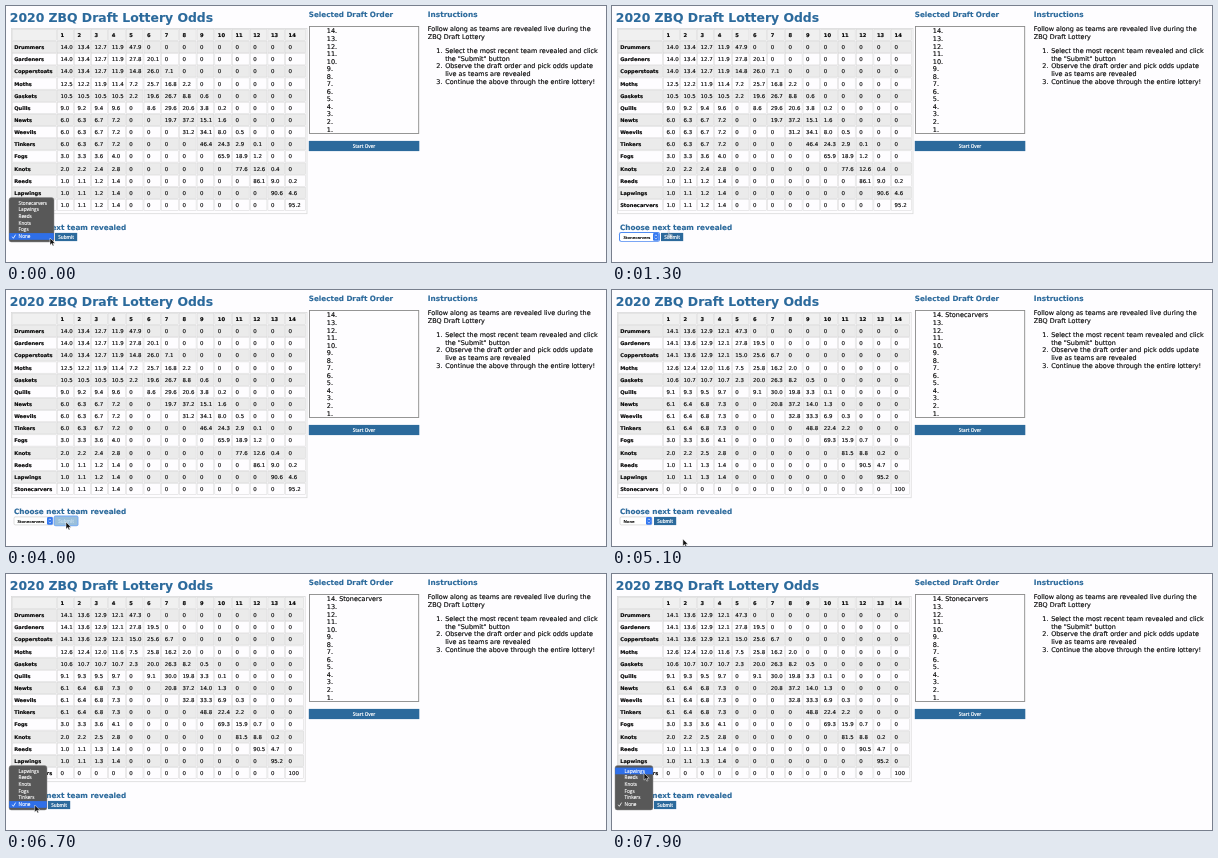
These frames come from a looping animation (600x256 px, 8000 ms). An HTML page:

```html
<!DOCTYPE html>
<html lang="en">
<head>
<meta charset="utf-8">
<title>Draft Lottery Odds</title>
<style>
html, body { margin: 0; width: 100%; height: 100%; overflow: hidden; background: #fefdff; }
svg { display: block; width: 600px; height: 256px; font-family: "DejaVu Sans", Verdana, sans-serif; }
text { white-space: pre; fill: currentColor; stroke: currentColor; stroke-width: 0.13px; }
.ui { font-family: "Open Sans", "Noto Sans", sans-serif; }
</style>
</head>
<body>
<svg id="stage" viewBox="0 0 600 256"></svg>
<script>
const NS = 'http://www.w3.org/2000/svg';
const stage = document.getElementById('stage');
const LOOP = 8000, STEP = 100;
const BLUE = '#2c6a9c', INK = '#000', PAGE = '#fefdff';

const teams = ['Drummers', 'Gardeners', 'Copperstoats', 'Moths', 'Gaskets', 'Quills', 'Newts',
  'Weevils', 'Tinkers', 'Fogs', 'Knots', 'Reeds', 'Lapwings', 'Stonecarvers'];
const weights = [14, 14, 14, 12.5, 10.5, 9, 6, 6, 6, 3, 2, 1, 1, 1];

function el(parent, tag, attrs = {}, content) {
  const node = document.createElementNS(NS, tag);
  set(node, attrs);
  if (content !== undefined) node.textContent = content;
  return parent.appendChild(node);
}
function set(node, attrs) {
  for (const key in attrs) node.setAttribute(key, attrs[key]);
}
function label(parent, x, y, size, content, attrs) {
  return el(parent, 'text', { x, y, 'font-size': size, color: INK, ...attrs }, content);
}
function box(parent, x, y, width, height, fill, attrs) {
  return el(parent, 'rect', { x, y, width, height, fill, ...attrs });
}
const show = (node, on) => node.setAttribute('visibility', on ? 'visible' : 'hidden');
const heading = (x, y, size, content) =>
  label(stage, x, y, size, content, { color: BLUE, 'font-weight': 700 });

// Four weighted draws without replacement; the rest keep their order.
function lotteryOdds(w) {
  const n = w.length;
  const odds = w.map(() => Array(14).fill(0));
  const draw = (picked, left, p) => {
    if (picked.length === 4) {
      let place = 4;
      for (let i = 0; i < n; i++) if (!picked.includes(i)) odds[i][place++] += p;
      return;
    }
    for (let i = 0; i < n; i++) {
      if (picked.includes(i)) continue;
      const q = p * w[i] / left;
      odds[i][picked.length] += q;
      draw([...picked, i], left - w[i], q);
    }
  };
  draw([], w.reduce((a, b) => a + b), 100);
  return odds;
}
const format = v => v < 0.05 ? '0' : v > 99.95 ? '100' : v.toFixed(1);

const colX = i => i < 4 ? 54.5 + 17.05 * i : 123.3 + 17.7 * (i - 4);

function buildTable(odds, right) {
  const g = el(stage, 'g');
  box(g, 5.5, 22.5, right - 5.5, 185.2, PAGE, { stroke: '#dadada', 'stroke-width': 0.8 });
  for (let r = 0; r <= 14; r++) {
    const y = 23.3 + 12.15 * r;
    const fill = r === 0 ? '#f0f0f0' : r % 2 ? '#ebebeb' : PAGE;
    const border = { stroke: '#d6d6d6', 'stroke-width': 0.5 };
    box(g, 6.5, y, 44, 11.3, fill, border);
    if (r) label(g, 8.2, y + 7.6, 5.1, teams[r - 1], { 'font-weight': 700 });
    for (let c = 0; c < 14; c++) {
      const x = colX(c) - 3;
      const end = c === 13 ? right - 1.5 : colX(c + 1) - 4;
      box(g, x, y, end - x, 11.3, fill, border);
      if (r) label(g, colX(c), y + 7.6, 5.45, format(odds[r - 1][c]));
      else label(g, colX(c), y + 7.6, 5.2, c + 1, { 'font-weight': 700 });
    }
  }
  return g;
}

heading(3.8, 16.4, 12.4, '2020 ZBQ Draft Lottery Odds');
const before = buildTable(lotteryOdds(weights), 301);
const lastRow = Array(14).fill(0);
lastRow[13] = 100;
const after = buildTable([...lotteryOdds(weights.slice(0, 13)), lastRow], 299.2);

// Draft order panel
heading(302.8, 11.3, 7.2, 'Selected Draft Order');
box(stage, 303.5, 20.5, 109.2, 107, PAGE, { stroke: '#8a8a8a', 'stroke-width': 0.9 });
const order = [];
for (let i = 0; i < 14; i++) order.push(label(stage, 320.8, 27.4 + 7.55 * i, 6.5, `${14 - i}.`));
box(stage, 302.8, 134.9, 110.5, 10.2, BLUE);
label(stage, 358, 141.7, 4.6, 'Start Over',
  { class: 'ui', color: '#fff', 'text-anchor': 'middle', 'font-weight': 600 });

// Instructions
heading(421.8, 11.3, 7.35, 'Instructions');
[[421.8, 25, 'Follow along as teams are revealed live during the'],
 [421.8, 32.7, 'ZBQ Draft Lottery'],
 [430.3, 47, '1.'], [439.2, 47, 'Select the most recent team revealed and click'],
 [439.2, 54.6, 'the "Submit" button'],
 [430.3, 62.3, '2.'], [439.2, 62.3, 'Observe the draft order and pick odds update'],
 [439.2, 70, 'live as teams are revealed'],
 [430.3, 77.6, '3.'], [439.2, 77.6, 'Continue the above through the entire lottery!']
].forEach(([x, y, s]) => label(stage, x, y, 6.45, s));

// Form
heading(8, 224.4, 7.27, 'Choose next team revealed');
const selectRing = box(stage, 7, 226, 41, 9.8, '#4f8bf2', { rx: 2.2 });
const select = box(stage, 8, 226.9, 39, 8, '#fff', { rx: 1.4, 'stroke-width': 0.5 });
const choice = label(stage, 11.4, 232.5, 4.3, '', { class: 'ui', 'font-weight': 600 });
const stepper = el(stage, 'g');
box(stepper, 0, 227.1, 5.8, 7.6, '#3478f0', { rx: 1.3 });
el(stepper, 'path', {
  d: 'M1.7 230.2l1.2-1.4 1.2 1.4M1.7 231.7l1.2 1.4 1.2-1.4',
  fill: 'none', stroke: '#fff', 'stroke-width': 0.6
});
const submit = el(stage, 'g');
const submitRing = box(submit, -1.3, 225.6, 24.8, 10.7, '#7fb0ef', { rx: 2 });
const submitFace = box(submit, 0, 226.9, 22.2, 8.2, BLUE);
const submitText = label(submit, 11.1, 232.6, 4.6, 'Submit',
  { class: 'ui', 'text-anchor': 'middle', 'font-weight': 600 });

// Drop-down list
const ROW = 6.7, LIST_TOP = 193.6;
const menu = el(stage, 'g');
const menuBack = box(menu, 3, 191.5, 45, 44.5, '#585858', { rx: 2.6, stroke: '#8c8c8c', 'stroke-width': 0.5 });
const menuBar = box(menu, 3.2, 0, 44.6, ROW, '#2f6fe8');
const items = [];
for (let i = 0; i < 6; i++)
  items.push(label(menu, 12.6, LIST_TOP + ROW * i + 5, 4.7, '', { class: 'ui', color: '#fff' }));
el(menu, 'path', { d: 'M6.2 230.7l1.2 1.6 2.2-3.7', fill: 'none', stroke: '#fff', 'stroke-width': 0.8 });

// Pointers
const arrow = el(stage, 'path', {
  d: 'M0 0v7.2l1.7-1.6 1.1 2.5 1.2-.5-1.1-2.4h2.3z',
  fill: '#111', stroke: '#fff', 'stroke-width': 0.5
});
const hand = el(stage, 'path', {
  d: 'M0 .6q.7-1 1.3 0v3l3 .7q.7.3.5 1.2l-.6 2.7h-3.6l-2.2-3.2q.2-1 1.6 0z',
  fill: '#fff', stroke: '#555', 'stroke-width': 0.4, opacity: 0.5
});

// time, x, y
const path = [
  [0, 44, 232], [500, 44, 232], [800, 30, 197], [1000, 30, 197], [1300, 56, 224],
  [1600, 60, 232], [4000, 60, 232], [4600, 70, 249], [5700, 72, 249], [6000, 71, 244],
  [6500, 28, 231], [7000, 30, 231], [7300, 34, 222], [7600, 33, 208], [7900, 32, 199], [LOOP, 32, 199]
];
function pointerAt(t) {
  const i = path.findIndex(p => p[0] > t);
  const [t0, x0, y0] = path[i - 1], [t1, x1, y1] = path[i];
  const u = (t - t0) / (t1 - t0), e = u * u * (3 - 2 * u);
  return [x0 + (x1 - x0) * e, y0 + (y1 - y0) * e];
}

function render(ms) {
  const t = Math.floor(ms % LOOP / STEP) * STEP;
  const [x, y] = pointerAt(t);
  const picked = t >= 1000 && t < 4200;
  const done = t >= 4200;
  const open = t < 1000 || t >= 6600;
  const hover = t >= 1500 && t < 4200;
  const focused = picked && t < 3200;

  show(before, !done);
  show(after, done);
  order[0].textContent = done ? `14. ${teams[13]}` : '14.';

  const width = done ? 32 : 39;
  set(select, { width, stroke: focused ? 'none' : '#bdbdbd' });
  choice.textContent = picked ? teams[13] : 'None';
  stepper.setAttribute('transform', `translate(${width + 2})`);
  show(selectRing, focused);
  submit.setAttribute('transform', `translate(${width + 10})`);
  show(submitRing, t >= 3200 && t < 4200);
  submitFace.setAttribute('fill', hover ? '#9abfdb' : BLUE);
  submitText.setAttribute('color', hover ? '#c6dcea' : '#fff');

  show(menu, open);
  const menuWidth = done ? 38 : 45;
  const row = Math.max(0, Math.min(5, Math.floor((y - LIST_TOP) / ROW)));
  menuBack.setAttribute('width', menuWidth);
  set(menuBar, { y: LIST_TOP + ROW * row, width: menuWidth - 0.4 });
  const last = done ? 12 : 13;
  items.forEach((item, i) => { item.textContent = i < 5 ? teams[last - i] : 'None'; });

  const overButton = t >= 1200 && t < 1500;
  show(arrow, !overButton);
  show(hand, overButton);
  for (const node of [arrow, hand]) node.setAttribute('transform', `translate(${x} ${y})`);
}

const start = performance.now();
function frame() {
  render(performance.now() - start);
  requestAnimationFrame(frame);
}
frame();
</script>
</body>
</html>
```
